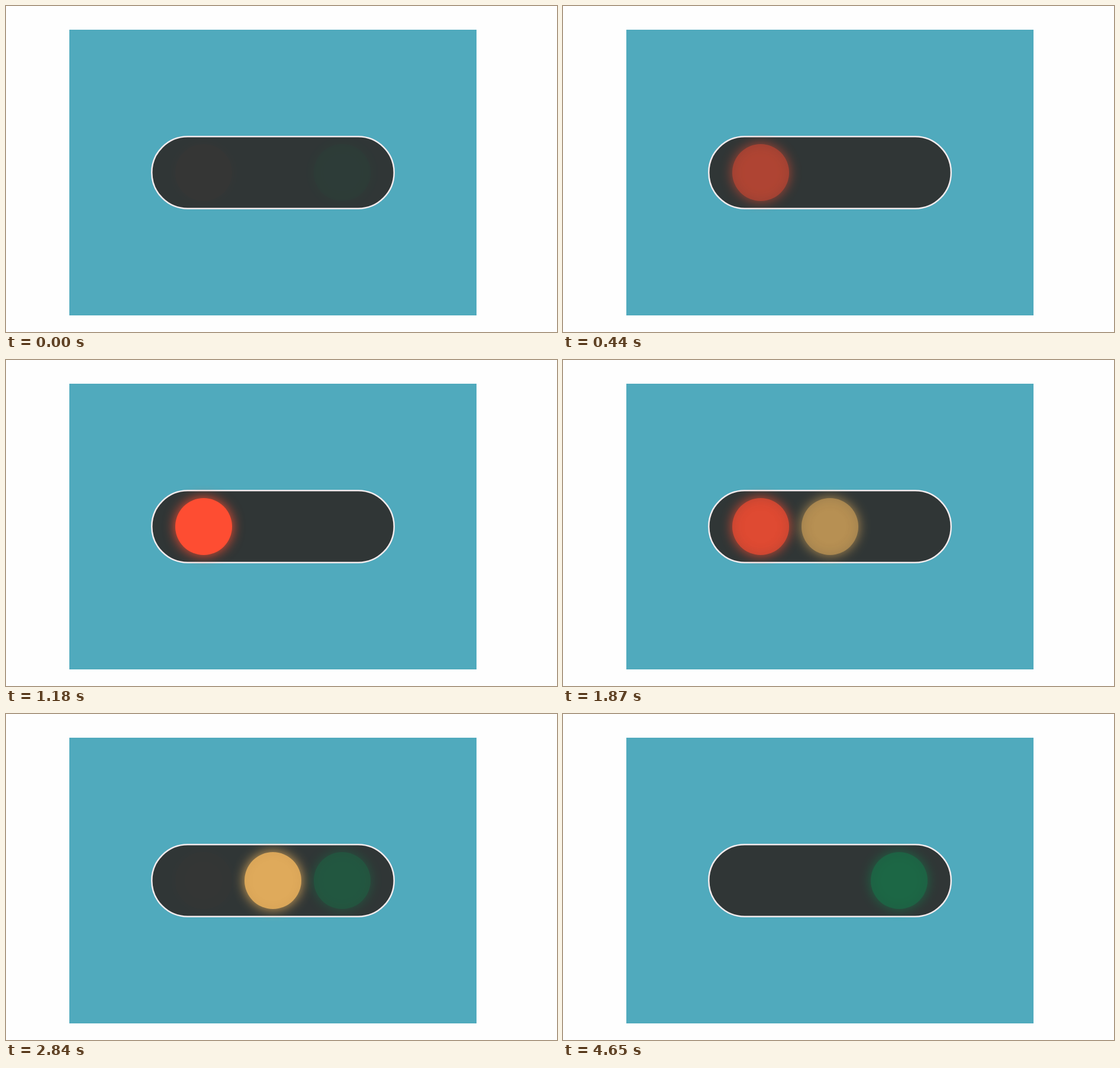
An HTML page for the animation above (4.78 s loop, 931x550 px).

```html
<!DOCTYPE html>
<html lang="en">
<head>
<meta charset="utf-8">
<title>Traffic light</title>
<style>
  html, body { margin: 0; width: 100%; height: 100%; overflow: hidden; background: #fefefe; }
  svg { position: absolute; left: 0; top: 0; }
  .light {
    position: absolute; top: 233px; width: 96px; height: 96px;
    border-radius: 50%; opacity: 0;
    background: var(--color);
    box-shadow: 0 0 20px var(--color), inset 0 0 20px rgba(48, 54, 54, var(--rim, 0));
  }
  #red { left: 286px; --color: #ff4e32; }
  #amber { left: 403px; --color: #e4ae5d; }
  #green { left: 520px; --color: #00ae5c; }
</style>
</head>
<body>
<svg width="931" height="550">
  <rect x="107" y="40" width="688" height="482" fill="#50aabd"/>
  <rect x="246.25" y="220.25" width="409.5" height="121.5" rx="60.75"
        fill="#303636" stroke="#f2ecee" stroke-width="2.5"/>
</svg>
<div class="light" id="red"></div>
<div class="light" id="amber"></div>
<div class="light" id="green"></div>
<script>
const LOOP = 4780;    // visible part of the cycle, cut off hard
const CYCLE = 5160;   // full light cycle
const FADE = 1350;

const lights = [
  { id: 'red', on: -50, off: 1680 },
  { id: 'amber', on: 1250, off: 2750 },
  { id: 'green', on: 2550, off: 4190 }
].map(light => ({ ...light, style: document.getElementById(light.id).style }));

// The picture is held between these moments; elsewhere it steps every 50 ms.
const holds = [0, 110, 180, 260, 340, 430, 520, 620, 720, 850, 1000, 1180, 1360];
const lateHolds = [3730, 3910, 3980, 4040, 4190, 4370, 4470, 4650];

const lastOf = (times, t) => times.filter(time => time <= t).pop();

function heldTime(t) {
  if (t < 1360) return lastOf(holds, t);
  if (t >= 3730) return lastOf(lateHolds, t);
  return t - (t - 1360) % 50;
}

const bezier = (a, b, s) => 3 * a * s * (1 - s) ** 2 + 3 * b * s * s * (1 - s) + s ** 3;

// CSS "ease": cubic-bezier(.25, .1, .25, 1)
function ease(x) {
  if (x <= 0) return 0;
  if (x >= 1) return 1;
  let low = 0, high = 1;
  for (let i = 0; i < 24; i++) {
    const mid = (low + high) / 2;
    if (bezier(0.25, 0.25, mid) < x) low = mid; else high = mid;
  }
  return bezier(0.1, 1, low);
}

const brightness = ({ on, off }, t) =>
  ease((t - on) / FADE) * (1 - ease((t - off) / FADE));

function draw(now) {
  const t = heldTime(now % LOOP);
  for (const light of lights) {
    const level = Math.max(brightness(light, t), brightness(light, t + CYCLE));
    light.style.opacity = level;
    light.style.setProperty('--rim', Math.min(0.2, 1.4 * (1 - level)));
  }
}

const start = performance.now();
function tick() {
  draw(performance.now() - start);
  requestAnimationFrame(tick);
}
tick();
</script>
</body>
</html>
```
